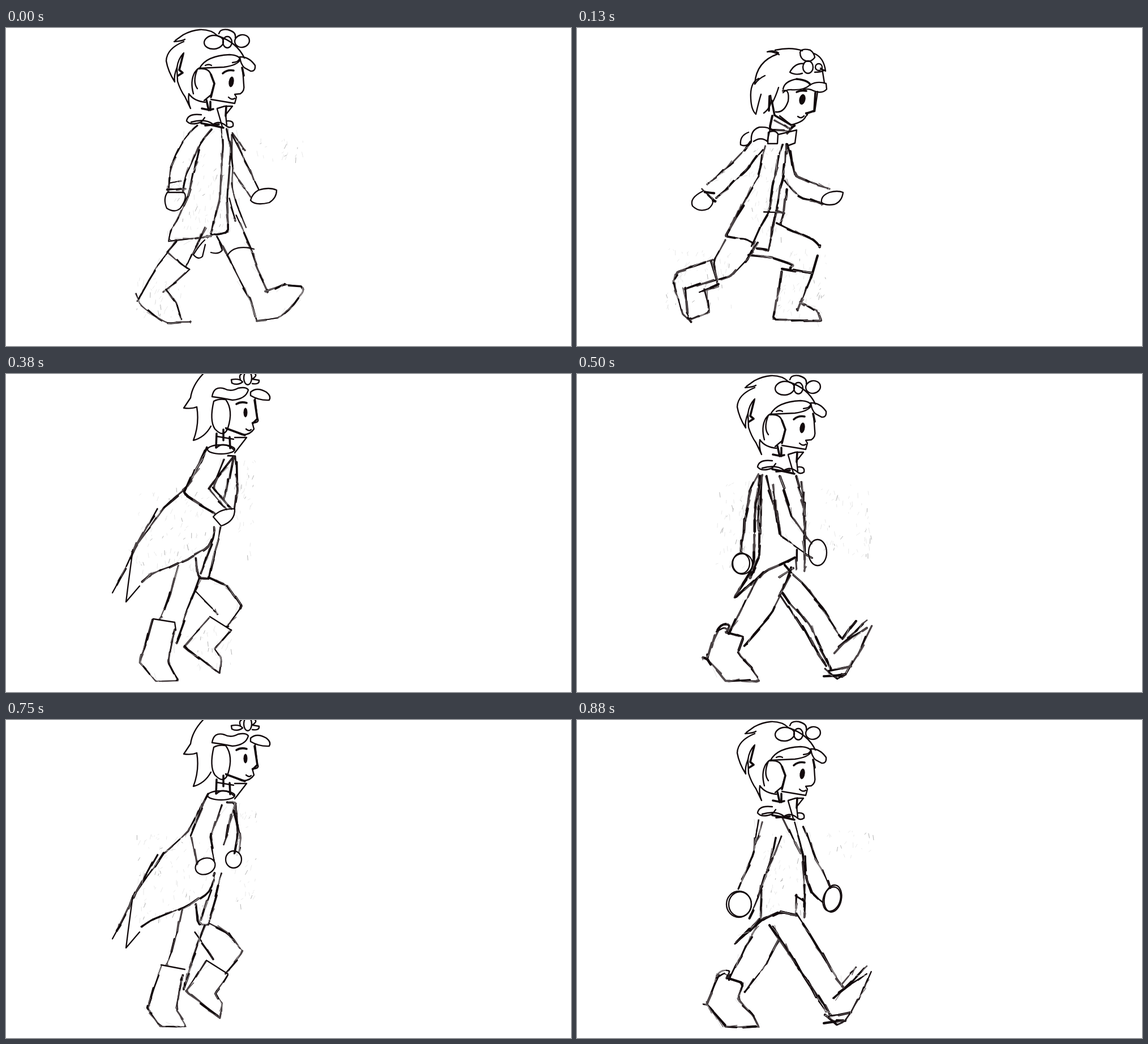
Animation, 998 px wide and 561 px high, one loop 1040 ms. Source, as an HTML page with a canvas:

```html
<!DOCTYPE html>
<html lang="en">
<head>
<meta charset="utf-8">
<title>Walk cycle</title>
<style>
html, body { margin: 0; width: 100%; height: 100%; overflow: hidden; background: #fff; }
canvas { display: block; width: 100vw; height: 100vh; }
</style>
</head>
<body>
<canvas id="stage" width="998" height="561"></canvas>
<script>
const ctx = document.getElementById('stage').getContext('2d');
const LOOP = 1040;
const INK = '#120a0c';

const oval = (x, y, rx, ry, tilt = 0) =>
  `M${x - rx * Math.cos(tilt)} ${y - rx * Math.sin(tilt)}` +
  [1, -1].map(s => `a${rx} ${ry} ${tilt * 180 / Math.PI} 0 1 ${2 * s * rx * Math.cos(tilt)} ${2 * s * rx * Math.sin(tilt)}`).join('');

// Heads: clean pen lines, heavy accents, filled eye
const highHead = {
  pen: [
    'M297 24Q312 23 316 20M299 22L313 12Q328 4 342 3Q362 2 374 14Q408 25 421 53',
    'M314 24Q284 36 283 58Q286 76 298 95Q296 84 302 70Q304 54 314 44',
    'M302 70L303 94Q308 110 316 121L326 142Q321 130 323 116Q332 129 352 131',
    'M331 116Q325 94 333 79Q340 68 345 71M338 73Q329 95 338 107M340 72Q358 70 362 82L368 98L362 118L350 128',
    'M342 71Q353 49 395 47Q412 48 414 56Q408 66 385 69Q362 70 342 71M352 66Q358 63 363 66M400 61Q412 60 413 53',
    'M413 51Q429 50 440 66Q441 77 432 76L421 70Q414 63 413 51',
    oval(367, 25, 17, 12, -.1), oval(391, 25, 8, 10), oval(417, 23, 13, 11, -.2), 'M376 10Q378 1 392 3Q407 7 405 17',
    'M418 72L420 100Q422 111 414 116L404 117L407 122L404 133L362 126M393 122Q399 128 404 124',
    'M345 153Q321 150 319 164Q326 173 345 166L351 158M327 166Q352 159 366 170Q375 163 387 171M391 164Q403 163 401 173Q394 178 388 172',
    'M373 143L382 174M373 142L386 138L400 138L388 153L390 172'
  ],
  bold: ['M383 80Q391 73 402 75', 'M417 70L420 84', 'M313 46L306 74L312 79L304 84', 'M362 82L368 98L362 122',
    'M354 127L358 145L366 143M361 130L361 145M346 142L356 144M389 138L388 155', 'M345 168L366 172L384 176M352 172L376 170'],
  eye: oval(398, 95, 4, 9, .15)
};
const lowHead = {
  pen: [
    'M357 47Q346 41 336 42Q346 38 356 44M350 39Q378 33 398 40M419 45Q436 52 439 76L430 71M354 46Q317 59 314 98',
    'M332 84Q321 89 314 99M321 89Q305 96 307 125Q308 145 316 152Q321 130 325 117M330 150Q346 138 342 119',
    'M363 111Q376 106 373 129Q366 150 351 148M356 105Q351 121 345 132',
    'M364 108Q366 94 388 90Q408 92 412 100Q402 110 380 109Q369 108 364 114',
    'M412 100Q425 93 440 98L441 108Q432 118 414 109Q407 107 400 108M433 72L437 97',
    'M394 43Q396 35 412 39Q419 44 420 52Q413 61 404 58Q394 55 394 43Z',
    oval(408, 69, 9, 11), oval(427, 69, 6, 6), 'M401 63Q385 61 376 78Q386 84 398 80M420 78Q432 78 438 74',
    'M425 112L420 147L404 150L407 153L404 156Q400 166 378 171L358 155M390 156Q396 161 401 155'
  ],
  bold: ['M388 113Q396 109 405 111', 'M421 114L419 146L405 151', 'M340 120L339 146M344 128L349 154L378 171', 'M388 90Q408 92 412 100'],
  eye: oval(398, 126, 5, 9, .2)
};
const proudHead = {
  pen: [
    'M348 0Q329 20 326 42L314 60Q328 62 337 58Q342 88 331 117Q351 112 362 92',
    'M367 48Q359 82 369 97Q385 114 392 95Q402 64 388 45M367 48Q376 43 388 45',
    'M364 40Q367 20 386 26Q397 32 410 25Q424 22 428 28Q424 44 400 46Q381 42 364 40',
    'M432 32Q443 22 460 32Q469 39 465 46Q447 47 432 38ZM398 10Q412 7 418 14Q409 21 399 16Z',
    oval(427, 7, 7, 12), 'M435 17Q448 19 447 11L435 9Q444 3 440 0M414 10Q411 2 416 0',
    'M440 44L444 78Q449 86 435 86L438 97Q431 108 416 107L388 95M424 97Q430 102 433 98',
    'M404 112L425 112L408 134L404 139M372 110L402 115', oval(380, 133, 24, 8), 'M372 130Q385 118 403 134'
  ],
  bold: ['M407 53Q415 48 425 51', 'M439 46L444 79L436 87', 'M372 105L371 130M384 98L384 117M395 111L396 131M389 96L422 108'],
  eye: oval(423, 68, 3, 8)
};

const ruffle = [
  'M303 184Q287 190 289 206Q297 210 306 203M308 200Q306 180 322 175Q338 174 341 179L336 200Q325 191 312 200',
  'M337 204L338 184Q350 179 355 187L354 204ZM355 188L388 180L385 203L374 207'
];
const tightRuffle = [
  'M306 204Q302 179 322 176Q336 171 334 182L325 200M334 179L352 185L355 204L330 202',
  'M355 186L392 190L394 210L358 208ZM376 184L378 209'
];
const capeTip = 'M200 364L188 386M224 310L216 370L212 402L236 374';
const cape = [
  'M356 130L346 152L322 196L280 235L232 300L196 372', 'M268 238L222 316', 'M240 366L258 352L320 328L355 306Q369 290 368 270',
  'M391 145L405 145L410 205L403 236M404 146L385 220M380 270L358 362L340 360L335 325M363 300L344 352'
];
const backStep = [
  'M318 362L296 405L268 458', 'M264 456L294 464L284 492L310 520L322 542L262 541L230 502L222 501',
  'M250 449L230 500M247 451Q255 438 270 443L264 456M246 454L260 447L268 452'
];
const frontBoot = ['M454 492L512 434M468 466L493 436M462 480L512 448', 'M520 444L498 492L474 530L460 538L438 520M436 534L474 530M445 523L484 516'];
const stepCoat = 'M324 180L325 250L322 322L278 395L330 350L385 324';

// weight: how hard the brush is pressed; dust: boxes of stray specks
const poses = [
  { at: 0, head: highHead, weight: .9,
    pen: ['M285 290Q277 302 284 318Q298 327 308 318Q322 298 314 290Z', 'M446 286Q465 280 478 286Q478 300 465 308Q440 314 432 304Q435 292 446 286Z',
      'M351 374Q342 382 331 400Q340 410 347 403L352 382M362 396Q376 400 382 392L377 378', 'M392 400Q402 384 430 388L438 390'],
    rough: ['M338 172Q315 190 305 215Q288 240 287 288', 'M362 178Q340 205 325 245Q313 265 313 290M284 284L317 284M289 273L309 270',
      'M342 215Q330 260 322 295Q306 336 290 358L287 376L335 371L362 367', 'M380 176L383 210L378 300L362 362',
      'M390 178L397 215L391 300L392 360Q378 365 362 364', 'M398 188L400 250Q397 282 407 310L424 352M395 300L405 340',
      'M400 188L425 240L446 284M402 255L432 298M400 185L422 216',
      'M300 376L267 420L232 482M352 352L333 392L318 420M287 396L308 416L325 426L278 466M282 462L300 484L310 514',
      'M230 468L236 486Q262 512 288 521L326 518', 'M372 368L394 406L432 482L443 516M407 330L432 388L445 425L462 466',
      'M458 466L492 452L522 456Q529 462 518 474Q500 502 478 512L443 517'],
    dust: [[440, 195, 85, 45], [230, 440, 90, 70], [300, 220, 90, 140]] },
  { at: 130, head: lowHead, collar: ruffle, weight: 1.1,
    pen: ['M222 288Q198 300 204 314Q216 326 232 319Q241 312 240 304', 'M432 308Q430 296 446 290Q460 286 470 290Q468 306 455 311Q440 314 432 308Z'],
    rough: ['M345 155L340 178L372 182M349 162L376 178M370 185L384 172', 'M308 202L272 240L230 276M328 214L300 250L246 300M220 284L244 306M226 288L242 292',
      'M332 208L320 262L295 308L262 368L298 372L312 380', 'M362 205L345 280L340 320L308 385', 'M372 205L362 270L350 330L338 394L318 388M372 285L360 346',
      'M372 205L386 262L446 284M368 268Q380 290 400 300L434 310', 'M352 345L395 364Q420 372 429 386M303 400L345 405L382 418L376 426',
      'M426 402L416 432L402 470L389 498M362 426L416 432M362 430L355 470L346 514L432 517L424 498L394 484',
      'M263 374L242 410L246 445M318 378L300 410L272 438L190 460', 'M240 408L178 430L170 447L186 505L202 518M238 412L250 456L222 464',
      'M190 458L196 508M226 460L234 502L200 514M216 466L250 452', 'M330 324L366 326'],
    dust: [[155, 385, 120, 110], [350, 390, 90, 130], [300, 210, 70, 160]] },
  { at: 250, head: lowHead, shift: [14, -22], collar: ruffle, weight: 1.1,
    pen: [oval(286, 287, 18, 15, -.4), oval(421, 288, 18, 13, -.2)],
    rough: ['M356 136L354 158L382 160M362 140L386 157', 'M324 182L294 235L266 294M342 192L318 252L289 306M264 293L288 306',
      'M340 192L328 255L302 305L270 365L302 360L344 362', 'M372 184L362 265L342 358', 'M382 184L376 265L362 368L340 366',
      'M384 184L390 242L412 278M374 248L390 275L404 294', 'M352 340L382 388L370 440M316 362L334 400L328 438',
      'M326 438L374 441L366 500L398 516L402 530L326 529L330 440', 'M300 362L296 410L250 438M340 366L326 412L276 456',
      'M252 436L282 460L248 492M250 438L206 466L198 500L222 526L250 518L242 490'],
    dust: [[180, 390, 90, 80], [300, 200, 80, 160]] },
  { at: 380, head: proudHead, weight: 1,
    pen: ['M366 252Q378 237 404 238Q405 260 380 268Z', 'M260 432L298 438L300 452M360 428L398 452', capeTip],
    rough: [...cape, 'M352 135L314 210L330 222L368 246', 'M400 148L358 202L390 240M384 150L366 200L398 238',
      'M304 338L290 390L272 432M342 362L318 420L302 475', 'M260 434L236 508L264 542L304 541L286 508L298 450',
      'M358 358L390 374L417 410L390 446M336 384L374 424', 'M358 430L314 482L378 528L380 500L368 484L398 452'],
    dust: [[405, 150, 38, 180], [230, 200, 130, 150], [320, 440, 80, 80]] },
  { at: 500, head: highHead, weight: 1.2,
    pen: [oval(292, 335, 18, 18), oval(290, 334, 15, 18), oval(425, 315, 16, 23)],
    rough: [stepCoat, ...backStep, ...frontBoot, 'M320 176L305 205L289 315M328 178L315 225L312 350', 'M322 180L320 250L322 320L306 360',
      'M333 180L350 242L360 285L415 325M360 180L378 250L415 300M345 195L356 264', 'M388 180L402 240L402 348M398 190L404 290M389 310L387 346',
      'M380 342L345 420L296 480M358 360L382 342', 'M366 338L400 370L435 415L466 465M358 390L400 450L440 515M362 388L412 444L448 520'],
    dust: [[430, 195, 90, 125], [245, 190, 70, 150]] },
  { at: 630, head: lowHead, shift: [0, -4], collar: tightRuffle, weight: 1.35,
    pen: [],
    rough: ['M344 151L338 178M349 158L376 176M370 185L378 168', 'M302 205L270 232L246 278L252 335M318 208L278 235L248 270M270 284L274 300L262 325',
      'M326 202L305 255L270 325L215 400L150 500', 'M322 208L300 262L280 300M240 395Q300 385 345 345L360 285', 'M326 200L322 244M316 212L280 246M332 206L362 280',
      'M335 205L345 240L366 280L425 345M372 208L380 245L405 275L450 318', 'M420 322L466 316L468 330L462 344L422 346',
      'M380 300L378 350L364 380L344 345L362 318M364 280L354 330', 'M345 345L385 390L412 430L416 480L412 505M318 412L345 425L366 442L358 535',
      'M358 534L442 542L436 515L412 504', 'M355 372L300 420L258 450L215 465M205 410L178 444L160 482', 'M240 396L200 408L185 445Q208 443 220 462',
      'M148 502L178 548L224 546L204 494L220 466'],
    dust: [[115, 400, 130, 110], [200, 225, 60, 90], [410, 230, 60, 80], [270, 230, 85, 150], [360, 400, 85, 120]] },
  { at: 750, head: proudHead, weight: 1,
    pen: [oval(352, 258, 18, 14, -.4), oval(402, 246, 14, 15), 'M274 432L316 440M354 424L392 448', capeTip],
    rough: [...cape, 'M350 142L326 205L338 254M382 150L362 205L367 248', 'M402 160L414 205L412 234',
      'M312 334L298 390L284 432M350 362L330 420L314 475', 'M274 434L250 508L272 541L318 541L300 508L312 450',
      'M358 358L392 376L418 408L388 448M334 374L366 422', 'M354 426L318 478L378 526L382 500L370 482L392 450'],
    dust: [[405, 150, 38, 180], [230, 200, 130, 150]] },
  { at: 880, head: highHead, weight: 1.1,
    pen: [oval(286, 325, 22, 23), oval(288, 325, 20, 22), oval(452, 315, 15, 24, .2), oval(450, 316, 15, 22, .3)],
    rough: [...backStep, ...frontBoot, 'M320 176L312 235L285 298M328 180L315 220M362 205L335 270L305 350M352 208L336 268',
      'M325 300L325 350L278 395L330 350L360 338L388 345', 'M385 180L400 240L402 348M362 172L395 235M388 308L386 346M386 310L402 320',
      'M400 188L422 245L448 296M404 240L404 280L415 305L434 322', 'M355 388L335 430L296 480',
      'M388 340L412 380L440 425L470 472M340 362L380 420L440 515M346 364L400 450L448 520'],
    dust: [[440, 195, 85, 45], [330, 200, 70, 140]] }
];

let rnd;
function seed(n) {
  rnd = () => (n = n * 16807 % 2147483647) / 2147483647;
  rnd();
}
const between = (a, b) => a + (b - a) * rnd();

function stroke(d, width, color = INK) {
  ctx.lineWidth = width;
  ctx.strokeStyle = color;
  ctx.stroke(new Path2D(d));
}

// One short brush mark along a path, moved aside by a small amount
function mark(path, from, to, aside, width, color) {
  const a = path.getPointAtLength(from), b = path.getPointAtLength(to);
  const len = Math.hypot(b.x - a.x, b.y - a.y) || 1;
  const nx = -(b.y - a.y) / len, ny = (b.x - a.x) / len;
  const points = [0, .25, .5, .75, 1].map(k => {
    const p = path.getPointAtLength(from + (to - from) * k), off = aside * (1 - k * 1.4);
    return `${p.x + nx * off} ${p.y + ny * off}`;
  });
  stroke('M' + points.join('L'), width, color);
}

// A line built from overlapping marks of uneven pressure, with pale traces beside it
function sketch(d, weight) {
  for (const part of d.split(/(?=M)/)) {
    const path = document.createElementNS('http://www.w3.org/2000/svg', 'path');
    path.setAttribute('d', part);
    const total = path.getTotalLength();
    stroke(part, 1.5, '#40383a');
    for (let s = 0; s < total; s += between(13, 26)) {
      const end = Math.min(total, s + between(16, 42));
      mark(path, s, end, between(-1.8, 1.8) * weight, between(1.8, 4) * weight, rnd() < .8 ? INK : '#4a4244');
      if (rnd() < .45) mark(path, s, end, between(-3.5, 3.5) * weight, between(.7, 1.8), '#5c5456');
      if (rnd() < .4) mark(path, s, end, between(-9, 9), .8, '#dcdcdc');
    }
  }
}

function scatter([x, y, w, h]) {
  for (let i = 0; i < w * h / 190; i++) {
    const px = x + rnd() * w, py = y + rnd() * h;
    stroke(`M${px} ${py}l${between(-4, 2)} ${between(1, 9)}`, .8, i % 5 ? '#e2e2e2' : '#a0a0a0');
  }
}

function drawPose({ at, head, shift = [0, 0], collar = [], weight, pen, rough, dust }) {
  seed(at + 77);
  ctx.fillStyle = '#fff';
  ctx.fillRect(0, 0, 998, 561);
  ctx.lineCap = ctx.lineJoin = 'round';
  dust.forEach(scatter);
  rough.forEach(d => sketch(d, weight));
  pen.forEach(d => stroke(d, 2.3));
  ctx.save();
  ctx.translate(...shift);
  [...collar, ...head.pen].forEach(d => stroke(d, 2.4));
  head.bold.forEach(d => stroke(d, 3.6));
  ctx.fillStyle = INK;
  ctx.fill(new Path2D(head.eye));
  stroke(head.eye, 1);
  ctx.restore();
}

const start = performance.now();
let shown;
function tick() {
  const t = (performance.now() - start) % LOOP;
  const pose = poses.findLast(p => p.at <= t);
  if (pose !== shown) drawPose(shown = pose);
  requestAnimationFrame(tick);
}
tick();
</script>
</body>
</html>
```
